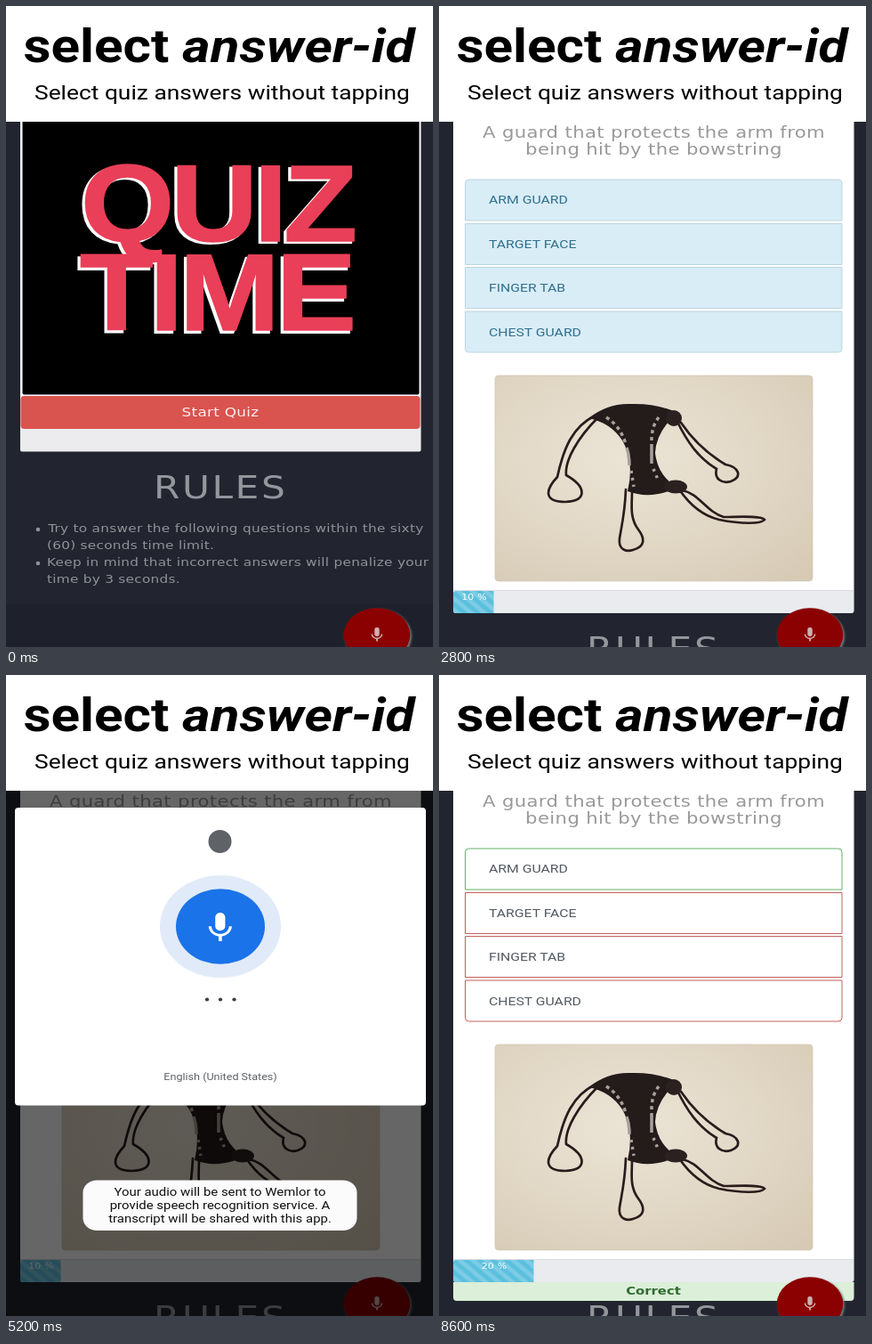
An HTML page that plays this animation: 480x720 px, repeating every 8.8 s.

```html
<!DOCTYPE html>
<html lang="en">
<head>
<meta charset="utf-8">
<title>select answer-id</title>
<style>
  html, body { margin: 0; width: 100%; height: 100%; overflow: hidden; background: #22252f; }
  svg { display: block; width: 480px; height: 720px; }

  /* The phone screen is shown a little wider than it is, so all type is too. */
  text { font-family: Roboto, sans-serif; transform-box: fill-box; transform-origin: left; transform: scaleX(1.1765); }
  .mid { text-anchor: middle; transform-origin: center; }
  .geo { font-family: "DejaVu Sans", sans-serif; letter-spacing: .018em; }

  .title { font-size: 51.2px; font-weight: 700; }
  .sub { font-size: 22.4px; }
  .logo { font: 700 123px "Liberation Sans", Arial, sans-serif; letter-spacing: -.03em; transform: scaleX(1.1); }
  .rules { font-size: 36px; letter-spacing: .06em; fill: #94969b; }
  .list { font-size: 13px; fill: #8f9298; }
  .start { font-size: 14.3px; fill: #fbeeee; }
  .ask { font-size: 18px; fill: #999; }
  .opt text { font-size: 13.4px; stroke: none; }
  .pct { font-size: 9.3px; fill: #fff; }
  .correct { font-size: 12.6px; font-weight: 700; letter-spacing: 0; fill: #2f6b31; }
  .voice { font-size: 16px; letter-spacing: .03em; fill: #3c4043; }
  .lang { font-size: 10.7px; fill: #5f6368; }
  .toast text { font-size: 12.7px; fill: #111; }

  /* Everything runs on one 8.8 s loop. */
  .intro, .quiz, .overlay, .dialog, .dots, .brief, .long, .late,
  .opt, .opt text, .before, .after { animation: 8.8s step-end infinite; }

  .intro { animation-name: intro; }
  .quiz { animation-name: quiz; }
  .overlay { animation-name: overlay; }
  .dialog { animation-name: nudge; }
  @keyframes intro { 0% { visibility: visible } 29.545%, 100% { visibility: hidden } }
  @keyframes quiz { 0% { visibility: hidden } 29.545%, 100% { visibility: visible } }
  @keyframes overlay {
    0% { opacity: 0 } 4.545% { opacity: .6 } 6.818% { opacity: 1 } 29.545% { opacity: 0 }
    50% { opacity: .6 } 52.273% { opacity: 1 } 86.364%, 100% { opacity: 0 }
  }
  @keyframes nudge { 0% { transform: none } 45%, 100% { transform: translateX(-1px) } }

  .ring { transform-box: fill-box; transform-origin: center; animation: ring 8.8s steps(3) infinite; }
  @keyframes ring {
    0% { transform: scale(1.02) } 6.818% { transform: scale(1.26) } 13.636% { transform: scale(1.1) }
    20.455% { transform: scale(1.33) } 27.273% { transform: scale(1.06) } 52.273% { transform: scale(1.1) }
    59.091% { transform: scale(1.36) } 65.909% { transform: scale(1.12) } 72.727% { transform: scale(1.32) }
    79.545% { transform: scale(1.06) } 86.364%, 100% { transform: scale(1.02) }
  }

  .dots { animation-name: dots; }
  @keyframes dots {
    0% { opacity: 1 } 18.182% { opacity: 0 } 50% { opacity: 1 } 68.182%, 100% { opacity: 0 }
  }
  /* Heard words: shown for 400 or 800 ms from --at on; the last word settles late. */
  .brief, .long { opacity: 0; animation-delay: var(--at); }
  .brief { animation-name: brief; }
  .long { animation-name: long; }
  .late { animation-name: late; animation-delay: var(--at); }
  @keyframes brief { 0% { opacity: 1 } 4.545%, 100% { opacity: 0 } }
  @keyframes long { 0% { opacity: 1 } 9.091%, 100% { opacity: 0 } }
  @keyframes late { 0% { fill: #9a9c9f } 4.545%, 100% { fill: #3c4043 } }

  .opt { --edge: #c4605d; animation-name: box; }
  .opt.good { --edge: #63b265; }
  .opt text { animation-name: label; }
  @keyframes box { 0% { fill: #d9edf7; stroke: #bcd6e2 } 88.636%, 100% { fill: #fff; stroke: var(--edge) } }
  @keyframes label { 0% { fill: #31708f } 88.636%, 100% { fill: #555b62 } }

  .before { animation-name: before; }
  .after { animation-name: after; }
  @keyframes before { 0% { opacity: 1 } 88.636%, 100% { opacity: 0 } }
  @keyframes after { 0% { opacity: 0 } 88.636%, 100% { opacity: 1 } }

  .stripes { animation: stripes 8.8s steps(44) infinite; }
  @keyframes stripes { to { transform: translateX(-135px) } }
  .rest { transform-box: fill-box; transform-origin: right; animation: rest 8.8s steps(3) infinite; }
  .slide { animation: slide 8.8s steps(3) infinite; }
  @keyframes rest { 0%, 88.636% { transform: none } 95.455%, 100% { transform: scaleX(.8889) } }
  @keyframes slide { 0%, 88.636% { transform: none } 95.455%, 100% { transform: translateX(22.5px) } }
</style>
</head>
<body>
<svg viewBox="0 0 480 720">
  <defs>
    <path id="mic" d="M12 14a3 3 0 0 0 3-3V5a3 3 0 0 0-6 0v6a3 3 0 0 0 3 3zM17.3 11c0 3-2.5 5.1-5.3 5.1S6.7 14 6.7 11H5c0 3.4 2.7 6.2 6 6.7V21h2v-3.3c3.3-.5 6-3.3 6-6.7z"/>
    <pattern id="stripe" width="15" height="12.7" patternUnits="userSpaceOnUse" x="16" y="657">
      <path fill="#fff" fill-opacity=".2" d="M0 6.35L7.5 12.7H0zM0 0H7.5L15 6.35V12.7z"/>
    </pattern>
    <clipPath id="track"><rect x="16" y="657" width="450" height="25" rx="3"/></clipPath>
    <clipPath id="frame"><rect x="63" y="415" width="357" height="231" rx="4"/></clipPath>
    <radialGradient id="table" cx=".42" cy=".4" r=".8">
      <stop offset="0" stop-color="#ebe4d6"/><stop offset=".5" stop-color="#e2d8c6"/><stop offset="1" stop-color="#d6cab5"/>
    </radialGradient>
    <filter id="soft" x="-20%" y="-20%" width="140%" height="140%"><feGaussianBlur stdDeviation="1.3"/></filter>
  </defs>

  <rect width="480" height="720" fill="#22252f"/>

  <g class="intro">
    <rect y="672" width="480" height="48" fill="#1e212b"/>
    <rect x="16" y="100" width="450.5" height="400.5" rx="2" fill="#ececef"/>
    <rect x="17" y="100" width="449" height="338" fill="#fff"/>
    <rect x="18.5" y="100" width="446" height="336.5" rx="2" fill="#000"/>
    <g fill="#fff" stroke="#fff" stroke-width="2">
      <text class="logo" x="81" y="266">QUIZ</text>
      <text class="logo" x="80" y="367">TIME</text>
    </g>
    <g fill="#ea3f58" stroke="#ea3f58" stroke-width="1.5">
      <text class="logo" x="84" y="264.5">QUIZ</text>
      <text class="logo" x="83" y="364">TIME</text>
    </g>
    <rect x="16.5" y="438" width="449" height="37" rx="4" fill="#d9534f"/>
    <text class="geo start mid" x="241" y="461.5">Start Quiz</text>
    <text class="geo rules" x="166" y="553">RULES</text>
    <g class="list">
      <circle cx="36" cy="588" r="2.3"/>
      <circle cx="36" cy="626" r="2.3"/>
      <text class="geo" x="47" y="591.5">Try to answer the following questions within the sixty</text>
      <text class="geo" x="46" y="610.5">(60) seconds time limit.</text>
      <text class="geo" x="46" y="629.5">Keep in mind that incorrect answers will penalize your</text>
      <text class="geo" x="46" y="648.5">time by 3 seconds.</text>
    </g>
  </g>

  <g class="quiz">
    <rect x="16" y="100" width="450.5" height="582" rx="3" fill="#fff"/>
    <text class="geo ask mid" x="241.5" y="148">A guard that protects the arm from</text>
    <text class="geo ask mid" x="241.5" y="167.5">being hit by the bowstring</text>

    <g class="opt good">
      <path d="M29.5 241V199q0-4 4-4H449q4 0 4 4V241z"/>
      <text x="56" y="222.5">ARM GUARD</text>
    </g>
    <g class="opt">
      <path d="M29.5 244.5H453V290.5H29.5z"/>
      <text x="56" y="272">TARGET FACE</text>
    </g>
    <g class="opt">
      <path d="M29.5 293.5H453V339.5H29.5z"/>
      <text x="56" y="321.3">FINGER TAB</text>
    </g>
    <g class="opt">
      <path d="M29.5 343H453V385q0 4-4 4H33.5q-4 0-4-4z"/>
      <text x="56" y="370.8">CHEST GUARD</text>
    </g>

    <g clip-path="url(#frame)">
      <rect x="63" y="415" width="357" height="231" fill="url(#table)"/>
      <g fill="none" stroke="#2a1c1c" stroke-width="2.7" stroke-linecap="round">
        <path d="M176 460C150 472 140 497 133 529C118 545 119 557 142 557C167 556 166 540 143 527C141 510 157 484 178 463"/>
        <path d="M210 543C209 570 205 585 203 598C201 612 212 613 218 611C233 607 231 597 224 588C214 575 217 560 217 545"/>
        <path d="M267 465C279 490 292 508 312 520C309 531 318 537 328 534C341 529 338 518 322 515C305 505 287 490 272 468"/>
        <path d="M270 543C283 562 298 573 315 577C340 582 362 582 366 577C362 572 335 574 320 574C300 568 292 547 273 544"/>
      </g>
      <path fill="#241b1b" d="M168 463Q190 446 215 447Q245 446 268 457Q244 478 243 502Q246 528 268 541Q238 555 212 545Q220 512 206 488Q193 468 168 463z"/>
      <ellipse cx="264" cy="463" rx="9" ry="9" fill="#2b2121"/>
      <ellipse cx="266" cy="540" rx="13" ry="7.5" fill="#2b2121"/>
      <g fill="none" stroke="#a9a09a" stroke-width="3.5">
        <path stroke-dasharray="4 4" d="M188 462Q204 472 210 492"/>
        <path stroke-dasharray="4 4" d="M247 462Q239 472 239 488"/>
        <path d="M211 496Q214 505 214 516M239 492V514"/>
        <path stroke-dasharray="3 5" d="M216 522L219 540M241 520L247 534"/>
      </g>
    </g>
    <rect x="63" y="415" width="357" height="231" rx="4" fill="none" stroke="#c9bfae" stroke-width=".6"/>

    <g clip-path="url(#track)">
      <rect x="16" y="657" width="450" height="25" fill="#5bc0de"/>
      <rect class="stripes" x="16" y="657" width="300" height="25" fill="url(#stripe)"/>
      <rect class="rest" x="61.5" y="657" width="405" height="25" fill="#e9ebef"/>
    </g>
    <path d="M16 656.5H466" stroke="#dcdde1"/>
    <g class="slide">
      <g class="before"><text class="geo pct mid" x="39.5" y="667.5">10 %</text></g>
      <g class="after"><text class="geo pct mid" x="39.5" y="667.5">20 %</text></g>
    </g>
    <text class="geo rules" x="166" y="734">RULES</text>
    <g class="after">
      <path d="M16 682H466.5V699q0 4-4 4H20q-4 0-4-4z" fill="#dcefd8"/>
      <text class="geo correct mid" x="241" y="696.5">Correct</text>
    </g>
  </g>

  <ellipse cx="418.5" cy="708" rx="37.5" ry="30.5" fill="#77787c" filter="url(#soft)"/>
  <ellipse cx="417" cy="706.5" rx="37.3" ry="30.3" fill="#8b0000"/>
  <use href="#mic" transform="translate(406.2 696.4) scale(.9 .82)" fill="#d0b0b0"/>

  <g class="overlay">
    <rect width="480" height="720" fill="#000" fill-opacity=".6"/>
    <g class="dialog">
      <rect x="11" y="149" width="462" height="334.5" rx="4" fill="#fff"/>
      <circle cx="241.5" cy="187" r="13" fill="#5f6368"/>
      <ellipse class="ring" cx="242" cy="282.5" rx="50" ry="42.3" fill="#e1eaf8"/>
      <ellipse cx="242" cy="282.5" rx="50" ry="42.3" fill="#1a73e8"/>
      <use href="#mic" transform="translate(219.5 263.7) scale(1.86 1.68)" fill="#fff"/>
      <g class="dots" fill="#3c4043">
        <ellipse cx="227" cy="364.5" rx="2.2" ry="1.9"/>
        <ellipse cx="242" cy="364.5" rx="2.2" ry="1.9"/>
        <ellipse cx="257.5" cy="364.5" rx="2.2" ry="1.9"/>
      </g>
      <g class="voice">
        <g class="brief" style="--at:1.6s"><text class="mid" x="242" y="370">start</text></g>
        <g class="long" style="--at:2s"><text class="mid" x="242" y="370">start <tspan class="late">quiz</tspan></text></g>
        <g class="brief" style="--at:6s"><text class="mid" x="242" y="370">select</text></g>
        <g class="brief" style="--at:6.4s"><text class="mid" x="242" y="370">select <tspan class="late">arm</tspan></text></g>
        <g class="long" style="--at:6.8s"><text class="mid" x="242" y="370">select <tspan class="late">arm guard</tspan></text></g>
      </g>
      <text class="lang mid" x="242" y="455">English (United States)</text>
      <g class="toast">
        <rect x="87.5" y="567.5" width="308" height="56.5" rx="16" ry="14" fill="#fbfbfb"/>
        <text class="mid" x="241.5" y="585.5">Your audio will be sent to Wemlor to</text>
        <text class="mid" x="241.5" y="600.5">provide speech recognition service. A</text>
        <text class="mid" x="241.5" y="615.5">transcript will be shared with this app.</text>
      </g>
    </g>
  </g>

  <rect width="480" height="130" fill="#fff"/>
  <text class="title" x="19.5" y="63.5">select <tspan font-style="italic">answer-id</tspan></text>
  <text class="sub" x="32" y="105.5">Select quiz answers without tapping</text>
</svg>
</body>
</html>
```
